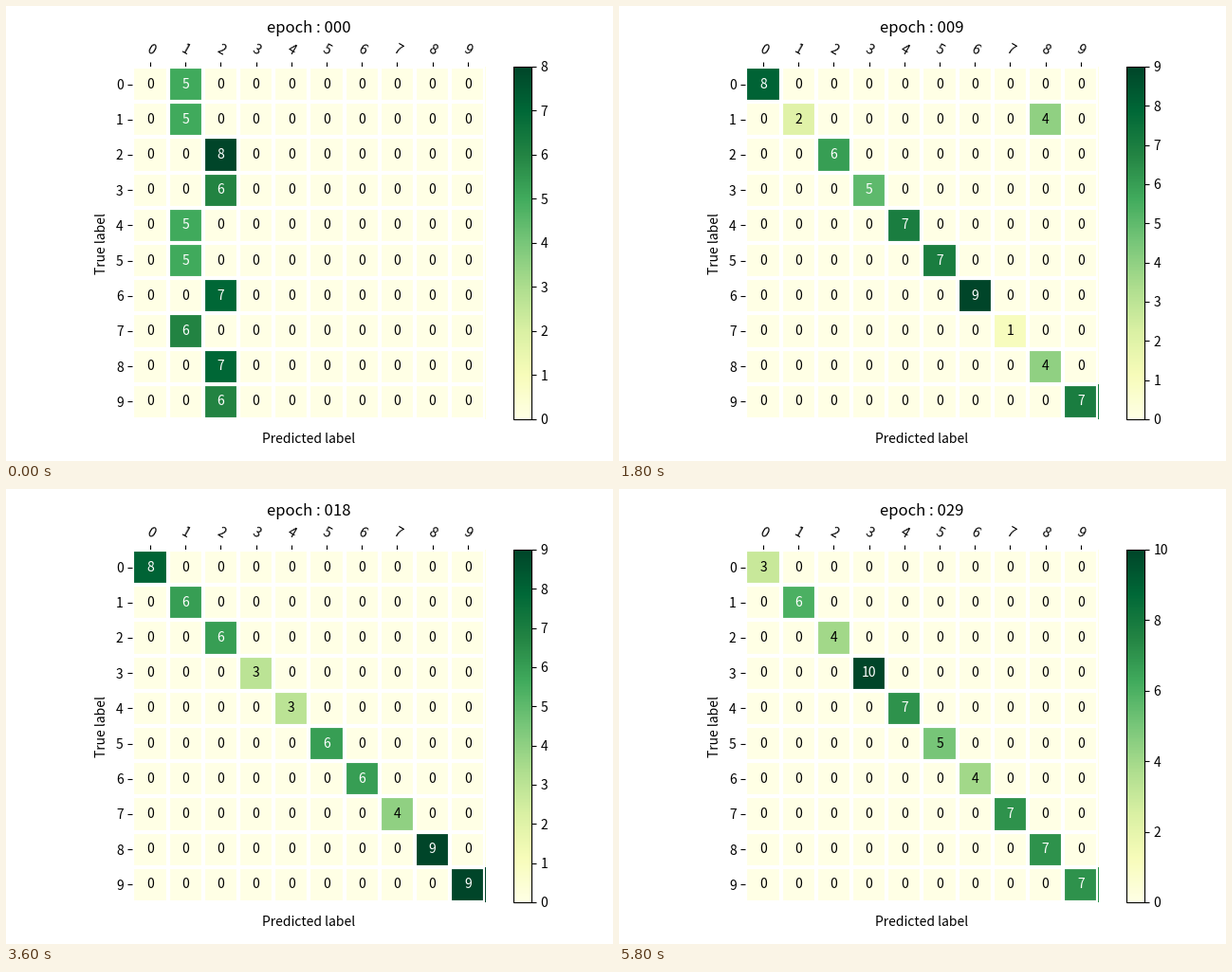
A matplotlib script that plays this animation: 640x480 px, repeating every 6 s.

```python
import numpy as np
import matplotlib.pyplot as plt
from matplotlib.animation import FuncAnimation

W, H = 640, 480
N, EPOCHS, BATCH = 10, 30, 60
LEFT, TOP, SIZE = 133.4, 63.95, 372

plt.rcParams["font.family"] = "Noto Sans CJK JP"
plt.rcParams["font.size"] = 10

# class each label is mistaken for: untrained, then partly trained
BLANK_GUESS = np.where(np.isin(range(N), [2, 3, 6, 8, 9]), 2, 1)
LOOKALIKE = np.array([7, 8, 6, 8, 1, 6, 8, 0, 2, 6])


def sample(rng, epoch):
    """Confusion matrix of one random batch; mistakes fade with training."""
    total = rng.multivariate_hypergeometric([12] * N, BATCH)
    slips = rng.random(N) < np.exp(-epoch / 6)
    share = max(0.6, 1 - epoch / 10)
    wrong = np.where(slips, rng.binomial(total, share), 0)
    m = np.diag(total - wrong)
    guess = BLANK_GUESS if epoch < 3 else LOOKALIKE
    np.add.at(m, (np.arange(N), guess), wrong)
    return m


def matrix(epoch):
    """Redraw batches until the largest count follows its slow rise."""
    rng = np.random.default_rng(epoch)
    peak = int(8.5 + 0.06 * epoch)
    while True:
        m = sample(rng, epoch)
        if m.max() == peak:
            return m


def box(x, y, w, h):
    return [x / W, 1 - (y + h) / H, w / W, h / H]


def label(x, y, s, **kw):
    return fig.text(x / W, 1 - y / H, s, ha="center", va="baseline",
                    rotation_mode="anchor", **kw)


fig = plt.figure(figsize=(W / 100, H / 100), dpi=100)
ax = fig.add_axes(box(LEFT, TOP, SIZE, SIZE))
im = ax.imshow(matrix(0), cmap="YlGn", aspect="auto")
fig.colorbar(im, cax=fig.add_axes(box(535.4, TOP, 18.6, SIZE)))

ax.set_xticks(range(N))
ax.set_yticks(range(N))
ax.tick_params(top=True, bottom=False, labeltop=True, labelbottom=False)
plt.setp(ax.get_xticklabels(), rotation=-30, ha="right",
         rotation_mode="anchor")
ax.spines[:].set_visible(False)

# white gaps between the cells
edges = np.arange(N + 1) - 0.5
ax.set_xticks(edges, minor=True)
ax.set_yticks(edges, minor=True)
ax.grid(which="minor", color="w", linestyle="-", linewidth=3)
ax.tick_params(which="minor", top=False, bottom=False, left=False)

mid = LEFT + SIZE / 2
title = label(mid, 28, "", fontsize=12)
label(mid, 461, "Predicted label")
label(105, 251, "True label", rotation=90)

cells = [[ax.text(j, i, "", ha="center", va="center") for j in range(N)]
         for i in range(N)]


def update(epoch):
    m = matrix(epoch)
    top = m.max()
    im.set_data(m)
    im.set_clim(0, top)
    title.set_text(f"epoch : {epoch:03d}")
    for i, j in np.ndindex(N, N):
        cells[i][j].set_text(str(m[i, j]))
        cells[i][j].set_color("white" if m[i, j] > top / 2 else "black")


anim = FuncAnimation(fig, update, frames=EPOCHS, interval=200, repeat=True,
                     repeat_delay=0, blit=False)
plt.show()
```
